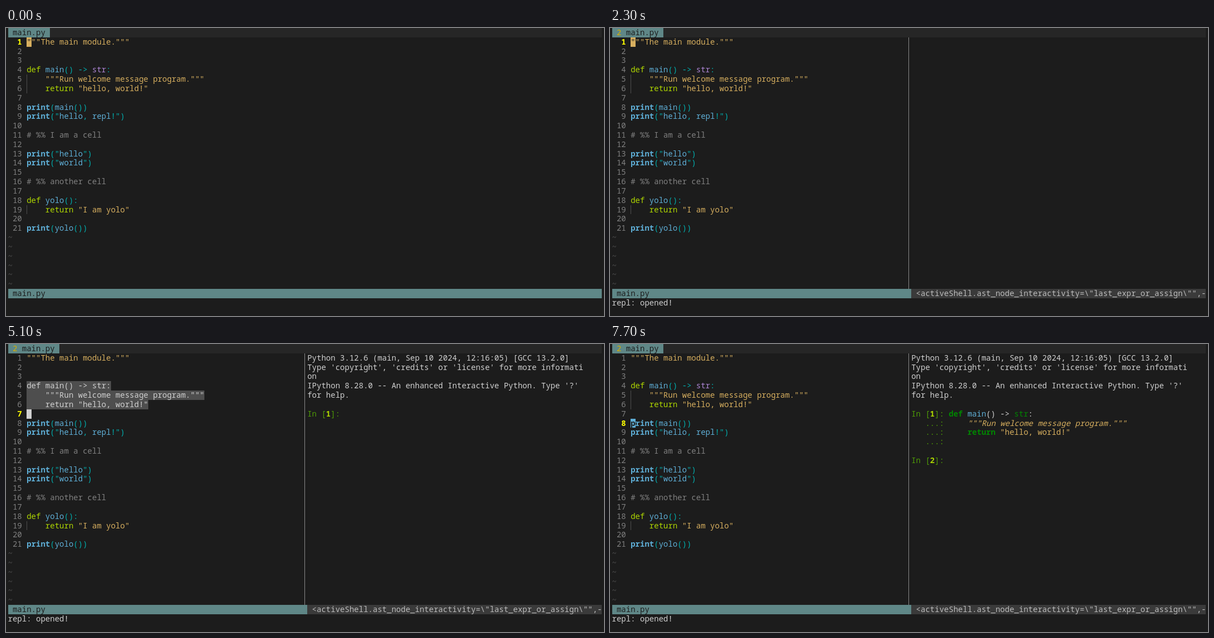
Recreate the animation shown at these times as an HTML page with a canvas. Size 1076 by 520 pixels, loop 8 s.

```html
<!DOCTYPE html>
<html lang="en">
<head>
<meta charset="utf-8">
<title>Editor with REPL</title>
<style>
html, body { margin: 0; width: 100%; height: 100%; overflow: hidden; background: #1c1c1c; }
canvas { display: block; }
</style>
</head>
<body>
<canvas id="stage" width="1076" height="520"></canvas>
<script>
const ctx = document.getElementById('stage').getContext('2d');
const LOOP = 8000, SPLIT = 64, COLS = 127;
const BG = '#1c1c1c', FG = '#d0d0d0', TEAL = '#5f8787', GREY = '#808080', DIM = '#4e4e4e',
      GUIDE = '#8a8a8a', PROMPT = '#4e9a06', LIME = '#afd700', GOLD = '#d7af5f';

const code = `"""The main module."""


def main() -> str:
    """Run welcome message program."""
    return "hello, world!"

print(main())
print("hello, repl!")

# %% I am a cell

print("hello")
print("world")

# %% another cell

def yolo():
    return "I am yolo"

print(yolo())`.split('\n');

const banner = `Python 3.12.6 (main, Sep 10 2024, 12:16:05) [GCC 13.2.0]
Type 'copyright', 'credits' or 'license' for more informati
on
IPython 8.28.0 -- An enhanced Interactive Python. Type '?'
for help.`.split('\n');

const commands = ['', 'Clear', 'Close', 'Open', 'RunCell', 'SendArgs', 'Toggle'];

// [start ms, cursor row]; row 0 means the cursor is in the command line
const moves = [[0, 1], [700, 0], [2300, 1], [3500, 2], [3600, 3], [3900, 4], [4500, 5], [4700, 6],
               [5100, 7], [5600, 4], [6800, 5], [7000, 6], [7300, 7], [7700, 8]];

// Token groups: comment, docstring, string, keyword, print, type, name, other
const token = /(#.*)|(""".*""")|(".*?")|(\b(?:def|return)\b)|(\bprint\b)|(\bstr\b)|(\w+)|([^\w\s]+|\s+)/g;
const editorTheme = [[GREY], [GOLD], [GOLD], [LIME], ['#5fafd7', 'bold'], ['#af87d7'], ['#5fafd7'], ['#00afaf']];
const replTheme = [[GREY], [GOLD, 'italic'], [GOLD], ['#008700', 'bold'], [FG], ['#008700'], ['#5fafd7'], [FG]];

const x = col => 3.5 + col * 8.417;
const y = row => Math.round(row * 16.82);

function fill(row, col, cols, color, rows = 1) {
  const left = Math.round(x(col)), top = y(row);
  ctx.fillStyle = color;
  ctx.fillRect(left, top, Math.round(x(col + cols)) - left, y(row + rows) - top);
}

function text(row, col, str, color = FG, style = '') {
  ctx.font = `${style} 14px "Noto Sans Mono", "DejaVu Sans Mono", monospace`;
  ctx.fillStyle = color;
  [...str].forEach((ch, i) => ctx.fillText(ch, x(col + i), y(row) + 13));
}

function highlight(row, col, line, theme) {
  for (const m of line.matchAll(token)) {
    const kind = m.slice(1).findIndex(Boolean);
    text(row, col + m.index, m[0], ...theme[kind]);
  }
}

function drawCursor(row) {
  const ch = (code[row - 1] || '')[0];
  const guided = ch === ' ';
  const first = ch && !guided && [...code[row - 1].matchAll(token)][0];
  const [color, style] = first ? editorTheme[first.slice(1).findIndex(Boolean)] : [guided ? GUIDE : FG];
  fill(row, 4, 1, color);
  if (first) text(row, 4, ch, BG, style);
  if (guided) drawGuide(row, BG);
}

function drawGuide(row, color) {
  ctx.fillStyle = color;
  ctx.fillRect(37, y(row), 1, y(row + 1) - y(row));
}

function drawEditor(t, cursor) {
  const selecting = t >= 4100 && t < 5600;
  const inMain = cursor >= 4 && cursor <= 6;
  code.forEach((line, i) => {
    const row = i + 1, current = row === Math.max(1, cursor);
    text(row, 1, String(row).padStart(2), current ? '#ffff00' : GREY, current ? 'bold' : '');
    if (selecting && row >= 4 && row <= cursor) {
      fill(row, 4, line.length, DIM);
      text(row, 4, line, '#d0d0d0');
    } else {
      highlight(row, 4, line, editorTheme);
    }
    if (line[0] === ' ') drawGuide(row, inMain && row < 7 ? GUIDE : DIM);
  });
  for (let row = 22; row < 28; row++) text(row, 0, '~', DIM);
  if (cursor) drawCursor(cursor);
}

function drawPrompt(row, n) {
  text(row, SPLIT, 'In [', PROMPT);
  text(row, SPLIT + 4, n, LIME, 'bold');
  text(row, SPLIT + 5, ']:', PROMPT);
}

function drawRepl(t) {
  ctx.fillStyle = GUIDE;
  ctx.fillRect(537, y(1), 1, y(28) - y(1));
  fill(28, SPLIT, COLS - SPLIT, '#3a3a3a');
  text(28, SPLIT + 1, '<activeShell.ast_node_interactivity=\\"last_expr_or_assign\\"",-', '#bcbcbc');
  text(29, 0, 'repl: opened!');
  if (t < 2700) return;
  banner.forEach((line, i) => text(i + 1, SPLIT, line));
  drawPrompt(7, '1');
  if (t < 5700) return;
  code.slice(3, 6).forEach((line, i) => highlight(7 + i, SPLIT + 8, line, replTheme));
  for (let row = 8; row < 11; row++) text(row, SPLIT + 3, '...:', PROMPT);
  drawPrompt(12, '2');
}

function drawCommand(t) {
  const typed = t < 1000 ? 0 : Math.min(4, Math.floor((t - 900) / 100));
  text(29, 0, ':Repl'.slice(0, typed + 1));
  fill(29, typed + 1, 1, FG);
  if (t < 1500) return;
  fill(22, 0, 16, '#303030', 7);
  commands.forEach((name, i) => text(22 + i, 1, 'Repl' + name));
}

function draw(t) {
  const cursor = moves.filter(m => m[0] <= t).pop()[1];
  const split = t >= 2300;
  ctx.fillStyle = BG;
  ctx.fillRect(0, 0, 1076, 520);
  fill(0, 0, COLS, '#262626');
  fill(0, 0, split ? 11 : 9, TEAL);
  if (split) text(0, 1, '2', '#d7af00');
  text(0, split ? 3 : 1, 'main.py', BG);
  drawEditor(t, cursor);
  fill(28, 0, split ? SPLIT : COLS, TEAL);
  text(28, 1, 'main.py', BG);
  if (split) drawRepl(t);
  else if (t >= 700) drawCommand(t);
}

const start = performance.now();
function tick() {
  draw((performance.now() - start) % LOOP);
  requestAnimationFrame(tick);
}
tick();
</script>
</body>
</html>
```
